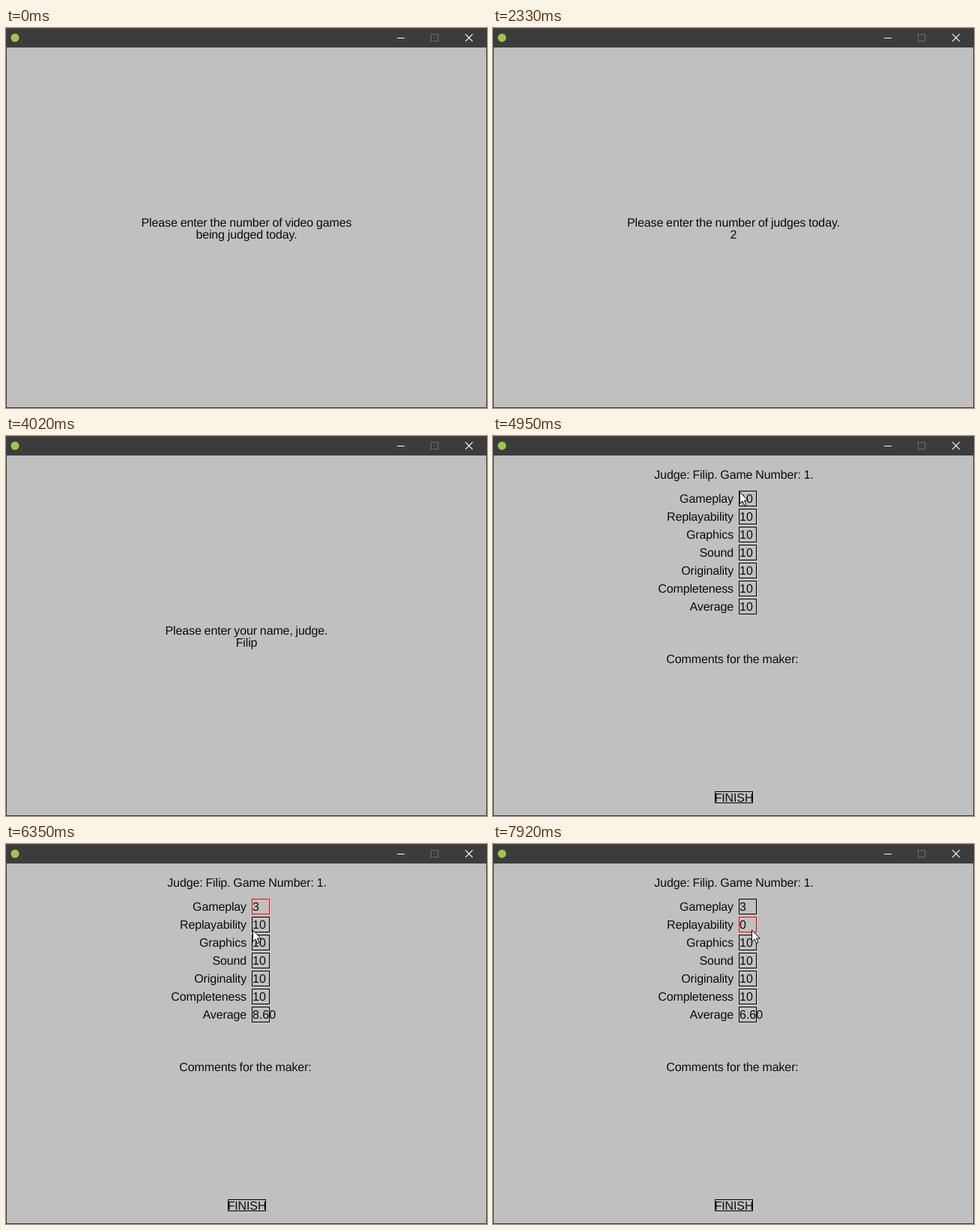
Write an HTML page that moves like this. It is 642x507 px and loops after 8000 ms.

```html
<!DOCTYPE html>
<html lang="en">
<head>
<meta charset="utf-8">
<title>Judging form</title>
<style>
html, body { margin: 0; width: 100%; height: 100%; overflow: hidden; background: #c0c0c0; }
svg { display: block; }
text {
  font: 16px "Liberation Sans", Arial, sans-serif;
  letter-spacing: -.13px;
  word-spacing: -.4px;
  text-rendering: geometricPrecision;
  white-space: pre;
  fill: #0c0c0c;
}
.mid { text-anchor: middle; }
.end { text-anchor: end; }
.value { letter-spacing: 0; }
.line { fill: none; stroke: #000; shape-rendering: crispEdges; }
.on .line { stroke: #f00; }
</style>
</head>
<body>
<svg width="642" height="507" viewBox="0 0 642 507">
  <rect width="642" height="507" fill="#3c3c3c"/>
  <rect width="642" height="1" fill="#4b4b4b"/>
  <rect x="1" y="26" width="640" height="480" fill="#c0c0c0"/>
  <circle cx="12" cy="13" r="5.5" fill="#9cc84a"/>
  <path class="line" d="M522 13.5H532" style="stroke:#fff"/>
  <rect class="line" x="567.5" y="8.5" width="9" height="9" style="stroke:#6a6a6a"/>
  <path d="M613.2 8.2L622.8 17.8M622.8 8.2L613.2 17.8" fill="none" stroke="#fff" stroke-width="1.2"/>

  <g id="prompt">
    <text class="mid" x="321"></text>
    <text class="mid" x="321"></text>
    <text class="mid" x="321"></text>
  </g>

  <g id="form" visibility="hidden">
    <text class="mid" x="321.5" y="57">Judge: Filip. Game Number: 1.</text>
    <g id="rows"></g>
    <text class="mid" x="319.5" y="303">Comments for the maker:</text>
    <rect class="line" x="296.5" y="474.5" width="50" height="15"/>
    <text class="mid" x="321.5" y="488">FINISH</text>
  </g>

  <path id="cursor" visibility="hidden" fill="#fff" stroke="#000"
    d="M.5 .8V16.2L4 12.9L6.5 18.6L8.9 17.6L6.4 12H11.3Z"/>
</svg>
<script>
const LOOP = 8000;
const FORM = 4340;
const POINTER = 4630;
const FRAME = 156.3;
const NAME = "Filip";

const $ = id => document.getElementById(id);
const labels = ["Gameplay", "Replayability", "Graphics", "Sound", "Originality", "Completeness", "Average"];

$("rows").innerHTML = labels.map((label, i) => `
  <g transform="translate(0 ${24 * i})">
    <text class="end" x="321" y="89">${label}</text>
    <rect class="line" x="328.5" y="73.5" width="23" height="20"/>
    <text class="value" x="329" y="89">10</text>
  </g>`).join("");

const rows = [...$("rows").children];
const values = rows.map(row => row.querySelector(".value"));
const lines = [...$("prompt").children];

// Key poses of the pointer: frame, x, y
const path = [
  [0, 389, 352], [2, 329, 74], [3, 331, 65], [7, 351, 90], [9, 351, 90],
  [11, 329, 114], [13, 326, 104], [15, 331, 103], [17, 350, 104],
  [19, 343, 110], [20, 343, 110], [21, 345, 114]
];

function typedName(t) {
  if (t >= 4020) return NAME;
  return NAME.slice(0, Math.min(3, Math.floor((t - 3080) / 160)));
}

function promptAt(t) {
  if (t < 1550) {
    return ["Please enter the number of video games", "being judged today.", t < 760 ? "" : "3"];
  }
  if (t < 2790) return ["Please enter the number of judges today.", t < 2330 ? "" : "2"];
  return ["Please enter your name, judge.", t < 3240 ? "" : typedName(t)];
}

function drawPrompt(t) {
  const words = t < FORM ? promptAt(t).filter(Boolean) : [];
  const top = 273 - 8 * (words.length - 1);
  lines.forEach((line, i) => {
    line.textContent = words[i] || "";
    line.setAttribute("y", top + 16 * i);
  });
}

function drawForm(t) {
  const selected = t < 5400 ? -1 : t < 7140 ? 0 : 1;
  const gameplay = selected < 0 ? 10 : t < 6030 ? 0 : 3;
  const replay = selected < 1 ? 10 : 0;
  const average = (gameplay + replay + 30) / 5;
  values[0].textContent = gameplay;
  values[1].textContent = replay;
  values[6].textContent = average === 10 ? "10" : average.toFixed(2);
  rows.forEach((row, i) => row.classList.toggle("on", i === selected));
  show($("form"), t >= FORM);
}

function drawPointer(t) {
  const frame = Math.floor((t - POINTER) / FRAME);
  show($("cursor"), frame >= 0);
  if (frame < 0) return;
  const next = Math.max(1, path.findIndex(key => key[0] >= frame));
  const [a, b] = [path[next - 1], path[next]];
  const k = (frame - a[0]) / (b[0] - a[0]);
  const [x, y] = [1, 2].map(i => Math.round(a[i] + (b[i] - a[i]) * k));
  $("cursor").setAttribute("transform", `translate(${x} ${y})`);
}

function show(el, visible) {
  el.setAttribute("visibility", visible ? "visible" : "hidden");
}

const start = performance.now();
function tick() {
  const t = (performance.now() - start) % LOOP;
  drawPrompt(t);
  drawForm(t);
  drawPointer(t);
  requestAnimationFrame(tick);
}
tick();
</script>
</body>
</html>
```
